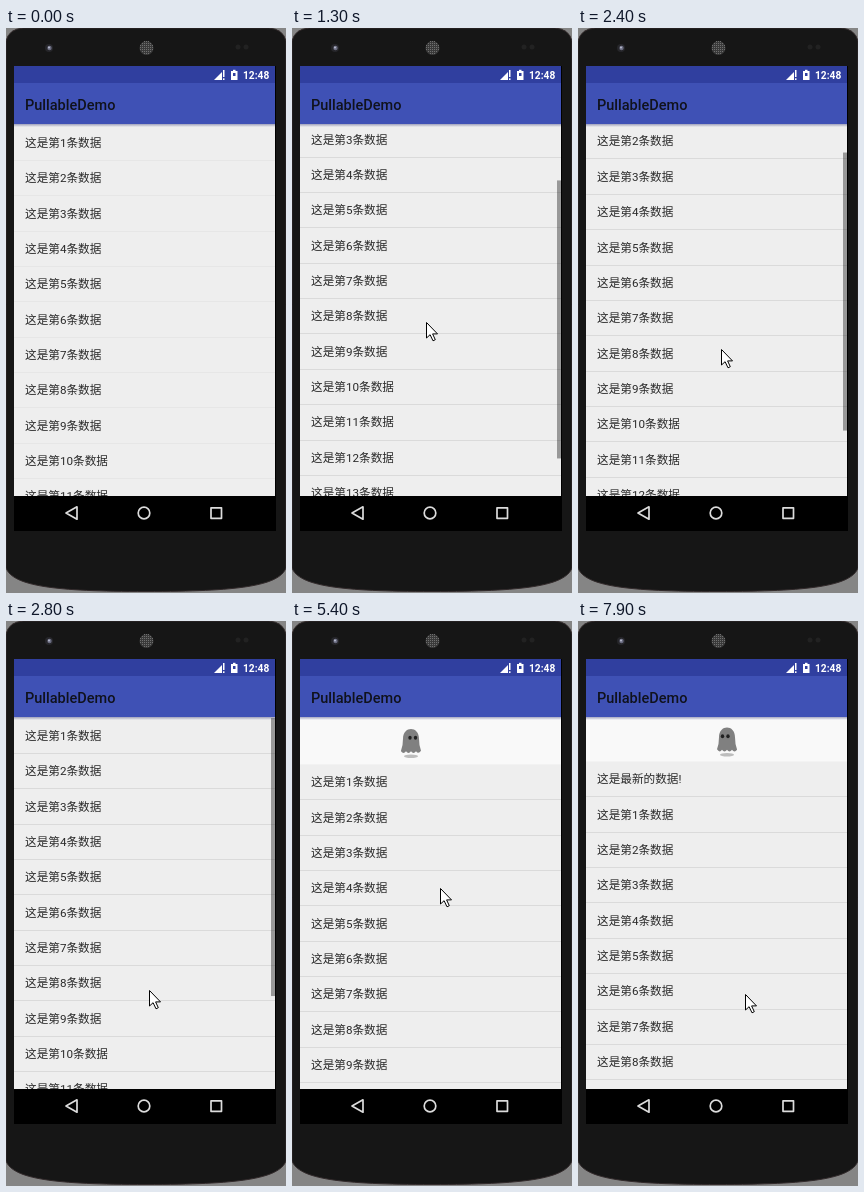
An HTML page with a canvas for the animation above (8000 ms loop, 280 by 565 pixels).

```html
<!DOCTYPE html>
<html lang="zh-CN">
<head>
<meta charset="utf-8">
<style>
html, body { margin: 0; width: 100%; height: 100%; overflow: hidden; background: #858585; }
canvas { display: block; width: 280px; height: 565px; }
</style>
</head>
<body>
<canvas id="stage"></canvas>
<script>
const LOOP = 8000, STEP = 100;
const LIST = { left: 8, top: 97, width: 261, height: 371, row: 35.36, count: 14 };
const MAX_SCROLL = LIST.row * LIST.count - LIST.height;
const REST_PULL = 43.5, RELEASE = 5700;
const CJK = 'Roboto, "Noto Sans CJK SC", "Noto Sans CJK", sans-serif';

// Each pointer move: start, end, then where it arrives.
const MOVES = [
  [100, 600, 121, 386],
  [700, 2000, 143, 234],
  [2000, 2800, 143, 369],
  [3000, 3700, 268, 93],
  [3700, 4000, 151, 200],
  [4000, 4600, 149, 237],
  [5000, RELEASE, 148, 279],
  [6800, 7400, 182, 436],
  [7400, 7900, 167, 373]
];

const canvas = document.getElementById('stage');
const scale = window.devicePixelRatio || 1;
canvas.width = 280 * scale;
canvas.height = 565 * scale;
const ctx = canvas.getContext('2d');

const clamp = (v, lo = 0, hi = 1) => Math.min(hi, Math.max(lo, v));
const lerp = (a, b, k) => a + (b - a) * k;
const easeOut = u => 1 - (1 - u) ** 1.5;

function pointerAt(t) {
  let x = 270, y = 137;
  for (const [start, end, toX, toY] of MOVES) {
    const k = easeOut(clamp((t - start) / (end - start)));
    x = lerp(x, toX, k);
    y = lerp(y, toY, k);
  }
  return { x, y };
}

// The list follows the finger: up, back down, then a damped pull past its top.
function scrollAt(t) {
  if (t < 700 || t > 2800) return 0;
  return clamp((t < 2000 ? 368 : 358) - pointerAt(t).y, 0, MAX_SCROLL);
}

function pullAt(t) {
  if (t < 4000) return 0;
  const dragged = Math.max(0, (pointerAt(Math.min(t, RELEASE)).y - 201) * 0.7);
  return lerp(dragged, REST_PULL, clamp((t - RELEASE) / 200));
}

function rect(color, x, y, w, h) {
  ctx.fillStyle = color;
  ctx.fillRect(x, y, w, h);
}

function ellipse(color, x, y, rx, ry = rx) {
  ctx.fillStyle = color;
  ctx.beginPath();
  ctx.ellipse(x, y, rx, ry, 0, 0, Math.PI * 2);
  ctx.fill();
}

function polygon(...points) {
  ctx.beginPath();
  points.forEach(([x, y]) => ctx.lineTo(x, y));
  ctx.closePath();
}

function text(string, x, y, font, color) {
  ctx.font = font;
  ctx.fillStyle = color;
  ctx.fillText(string, x, y);
}

function drawPhone() {
  rect('#858585', 0, 0, 280, 565);
  ctx.beginPath();
  ctx.moveTo(0, 13);
  ctx.quadraticCurveTo(3, 1, 17, 0);
  ctx.lineTo(263, 0);
  ctx.quadraticCurveTo(277, 1, 280, 13);
  ctx.lineTo(280, 540);
  ctx.bezierCurveTo(273, 558, 232, 563.5, 140, 563.5);
  ctx.bezierCurveTo(48, 563.5, 7, 558, 0, 540);
  ctx.closePath();
  ctx.fillStyle = '#161616';
  ctx.fill();
  ctx.strokeStyle = '#332b2c';
  ctx.lineWidth = 1;
  ctx.stroke();

  ellipse('#26262a', 43, 20, 4);
  ellipse('#6a6c80', 43.5, 20, 2.2);
  ellipse('#b9bcd0', 43, 19.6, 1);
  ellipse('#3a3a3a', 140.5, 20, 7);
  for (let x = -6; x <= 6; x += 2)
    for (let y = -6; y <= 6; y += 2)
      if (x * x + y * y < 42) rect('#707070', 140 + x, 19 + y, 1, 1);
  ellipse('#222', 232, 19, 2.5);
  ellipse('#222', 240, 19, 2.5);
}

function drawBars() {
  rect('#000', 8, 38, 262, 465);
  rect('#303f9f', 8, 38, 261, 17);
  rect('#3f51b5', 8, 55, 261, 41);
  text('PullableDemo', 19, 82, '500 14.5px Roboto, sans-serif', '#10121c');
  text('12:48', 237, 51, 'bold 10.2px Roboto, sans-serif', '#fff');

  ctx.fillStyle = '#fff';
  polygon([208, 52], [216, 44], [216, 52]);
  ctx.fill();
  rect('#fff', 217, 42, 1.5, 7);
  rect('#fff', 217, 50.3, 1.5, 1.7);
  rect('#fff', 225, 43, 6.5, 9);
  rect('#fff', 227, 41.8, 2.5, 1.5);
  rect('#303f9f', 227, 45, 2.5, 3);

  ctx.strokeStyle = '#dcdcdc';
  ctx.lineWidth = 1.7;
  ctx.lineJoin = 'round';
  polygon([60, 485], [71, 478.8], [71, 491.2]);
  ctx.stroke();
  ctx.beginPath();
  ctx.arc(138, 485, 5.8, 0, Math.PI * 2);
  ctx.stroke();
  ctx.strokeRect(205, 479.8, 10.5, 10.5);
}

function drawGhost(t, pull) {
  const size = clamp((pull - 14) / 28);
  if (!size) return;
  const walk = Math.max(0, t - 5400) / 2000;
  const goingRight = walk < 1;
  const x = 119 + 40 * (1 - Math.abs(1 - walk));
  const lift = t > 5900 ? 2 * (1 - Math.cos((t - 5900) / 500 * Math.PI * 2)) : 0;
  ctx.save();
  ctx.translate(x, LIST.top + Math.min(pull, 47) / 2 + 1.5);
  ctx.scale(goingRight ? size : -size, size);
  ellipse('#bdbdbd', 0, 13.5, 7 - lift * 0.4, 1.7);
  ctx.translate(0, -lift);
  ctx.fillStyle = '#808080';
  ctx.beginPath();
  ctx.moveTo(-10, 8);
  ctx.quadraticCurveTo(-8, 3, -8, -4);
  ctx.bezierCurveTo(-8, -17, 8, -17, 8, -4);
  ctx.quadraticCurveTo(8, 3, 10, 8);
  for (let i = 0; i < 4; i++) ctx.quadraticCurveTo(7.5 - i * 5, 12, 5 - i * 5, 8.5);
  ctx.fill();
  ellipse('#222', -1, -5, 1.7, 2);
  ellipse('#222', 4.5, -5, 1.7, 2);
  ctx.restore();
}

function drawGlow(strength) {
  const { left, top, width, height } = LIST;
  const bottom = top + height, edge = bottom - 21 * strength;
  ctx.fillStyle = `rgba(63,81,181,${0.06 * strength})`;
  ctx.beginPath();
  ctx.moveTo(left, bottom);
  ctx.lineTo(left, edge);
  ctx.quadraticCurveTo(left + width / 2, edge - 26 * strength, left + width, edge);
  ctx.lineTo(left + width, bottom);
  ctx.fill();
}

function drawList(t) {
  const { left, top, width, height, row, count } = LIST;
  const scroll = scrollAt(t), pull = pullAt(t);
  const rows = Array.from({ length: count }, (_, i) => `这是第${i + 1}条数据`);
  if (t >= 7800) rows.unshift('这是最新的数据!');

  ctx.save();
  ctx.beginPath();
  ctx.rect(left, top - 1, width, height + 1);
  ctx.clip();
  rect('#eee', left, top - 1, width, height + 1);
  if (pull) rect('#f9f9f9', left, top - 1, width, pull + 1);
  rows.forEach((label, i) => {
    const y = top + pull - scroll + i * row;
    text(label, 19, y + 21.8, '11.65px ' + CJK, '#2a2a2a');
    rect(t < 800 ? '#e6e6e6' : '#dadada', left, Math.floor(y + row), width, 1);
  });
  drawGhost(t, pull);
  drawGlow(clamp(1 - Math.abs(t - 2000) / 300));

  const ratio = height / (count * row);
  const barAlpha = clamp((t - 700) / 100) * clamp((3400 - t) / 400);
  rect(`rgba(0,0,0,${0.36 * barAlpha})`, 265, top + scroll * ratio, 4, height * ratio);

  const shadow = ctx.createLinearGradient(0, top - 1, 0, top + 2);
  shadow.addColorStop(0, 'rgba(40,45,110,.4)');
  shadow.addColorStop(1, 'rgba(40,45,110,0)');
  rect(shadow, left, top - 1, width, 3);
  ctx.restore();
}

function drawPointer(t) {
  if (t < 100) return;
  const { x, y } = pointerAt(t);
  ctx.save();
  ctx.translate(Math.round(x) + 0.5, Math.round(y) + 0.5);
  polygon([0, 0], [0, 15.5], [3.6, 12.2], [6.5, 18.3], [8.8, 17.2], [6.1, 11.4], [11, 11.4]);
  ctx.fillStyle = '#fff';
  ctx.fill();
  ctx.strokeStyle = '#000';
  ctx.lineWidth = 1;
  ctx.lineJoin = 'miter';
  ctx.stroke();
  ctx.restore();
}

function frame() {
  const t = Math.floor(performance.now() % LOOP / STEP) * STEP;
  ctx.setTransform(scale, 0, 0, scale, 0, 0);
  drawPhone();
  drawBars();
  drawList(t);
  drawPointer(t);
  requestAnimationFrame(frame);
}
frame();
</script>
</body>
</html>
```
